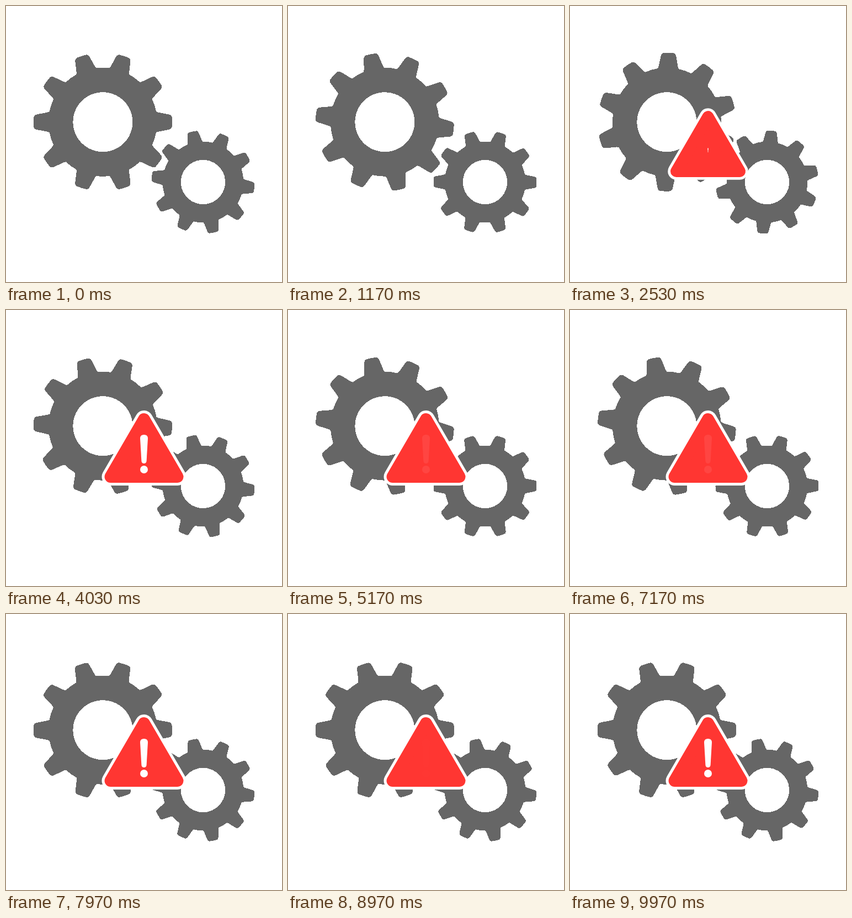
These frames come from a looping animation (500 by 500 pixels, 10 s). An HTML page:

```html
<!DOCTYPE html>
<html lang="en">
<head>
<meta charset="utf-8">
<title>Gears with warning</title>
<style>
  html, body { margin: 0; width: 100%; height: 100%; overflow: hidden; background: #fff; }
  svg { display: block; width: 100vw; height: 100vh; }
</style>
</head>
<body>
<svg viewBox="0 0 500 500">
  <defs><path id="gear" fill="#666" fill-rule="evenodd" shape-rendering="crispEdges"/></defs>
  <use id="big" href="#gear"/>
  <use id="small" href="#gear"/>
  <g id="sign" stroke-linejoin="round">
    <path d="M250 198L310.5 302H189.5Z" fill="#fff" stroke="#fff" stroke-width="32"/>
    <path d="M250 198L310.5 302H189.5Z" fill="#ff3632" stroke="#ff3632" stroke-width="22"/>
  </g>
  <g id="mark" fill="#fff">
    <path d="M243 232.5C243 228 246 226 250 226S257 228 257 232.5L254.6 273.5C254.4 276.5 252.5 278 250 278S245.6 276.5 245.4 273.5Z"/>
    <circle cx="250" cy="289" r="7"/>
  </g>
</svg>
<script>
const LOOP = 10000, FPS = 30, FRAMES = 300, TEETH = 10;
const $ = id => document.getElementById(id);

// Gear outline around the origin; each tooth point is [radius, half width].
function gearPath() {
  const pitch = 2 * Math.PI / TEETH;
  let d = '';
  for (let i = 0; i < TEETH; i++) {
    const c = Math.cos(i * pitch), s = Math.sin(i * pitch);
    const p = (r, w) => `${(r * c - w * s).toFixed(2)} ${(r * s + w * c).toFixed(2)} `;
    d += (i ? 'A98.5 98.5 0 0 1 ' : 'M') + p(96.6, -19.2);
    d += 'Q' + p(98, -18) + p(101, -17.4);
    d += 'L' + p(119.5, -13.8);
    d += 'Q' + p(124.3, -12.8) + p(125.1, -9);
    d += 'L' + p(125.5, 0) + p(125.1, 9);
    d += 'Q' + p(124.3, 12.8) + p(119.5, 13.8);
    d += 'L' + p(101, 17.4);
    d += 'Q' + p(98, 18) + p(96.6, 19.2);
  }
  d += 'A98.5 98.5 0 0 1 96.6 -19.2Z';
  return d + 'M54 0A54 54 0 1 0 -54 0A54 54 0 1 0 54 0Z';
}

const ease = u => {
  u = Math.min(1, Math.max(0, u));
  return u * u * (3 - 2 * u);
};

function pop(el, scale, x, y) {
  el.style.display = scale > 0 ? '' : 'none';
  el.setAttribute('transform', `translate(${x} ${y}) scale(${scale}) translate(${-x} ${-y})`);
}

function draw(ms) {
  const f = Math.min(FRAMES - 1, Math.floor((ms + 4) * FPS / 1000));
  const turn = 360 * f / (FRAMES - 1);
  $('big').setAttribute('transform', `translate(175.4 210.2) rotate(${turn})`);
  $('small').setAttribute('transform', `translate(357 319) rotate(${6.4 - turn}) scale(.745)`);

  pop($('sign'), ease((f - 50) / 30), 250, 250);
  pop($('mark'), ease((f - 70) / 30), 250, 261);

  // The mark fades out and back every two seconds.
  const phase = f < 120 ? 0 : f % 60;
  $('mark').setAttribute('opacity', 1 - ease(1 - Math.abs(phase - 30) / 30));
}

$('gear').setAttribute('d', gearPath());
const start = performance.now();
function tick() {
  draw((performance.now() - start) % LOOP);
  requestAnimationFrame(tick);
}
tick();
</script>
</body>
</html>
```
